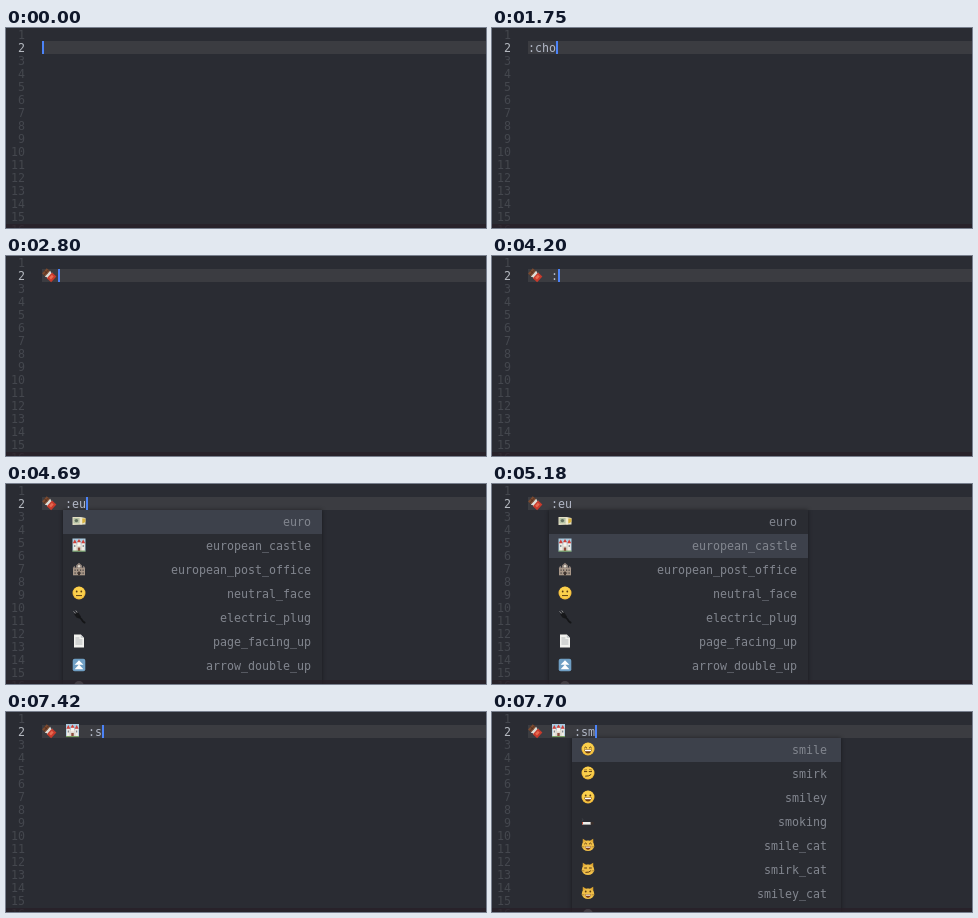
An HTML page that plays this animation: 480 px wide and 200 px high, repeating every 8 s.

```html
<!DOCTYPE html>
<html lang="en">
<head>
<meta charset="utf-8">
<title>Emoji autocomplete</title>
<style>
html, body { margin: 0; width: 100%; height: 100%; overflow: hidden; background: #2a2c33; }
svg { display: block; width: 480px; height: 200px; }
text { font: 11.63px "DejaVu Sans Mono", monospace; white-space: pre; }
.body { filter: drop-shadow(0 0 2px rgba(0, 0, 0, .45)); }
</style>
</head>
<body>
<svg id="stage" viewBox="0 0 480 200"></svg>
<script>
const LOOP = 8000, CHAR = 7, EMOJI = 16, LEFT = 36, ROW = 24;

// Small drawing helpers; every icon lives in a 14 x 14 box.
const rect = (x, y, w, h, fill, more = '') =>
  `<rect x="${x}" y="${y}" width="${w}" height="${h}" fill="${fill}" ${more}/>`;
const path = (d, fill) => `<path d="${d}" fill="${fill}"/>`;
const line = (d, color, width = 1) =>
  `<path d="${d}" fill="none" stroke="${color}" stroke-width="${width}" stroke-linecap="round"/>`;
const disc = (x, y, r, fill) => `<circle cx="${x}" cy="${y}" r="${r}" fill="${fill}"/>`;
const at = (x, y, inner) => `<g transform="translate(${x} ${y})">${inner}</g>`;
const label = (x, y, str, fill, anchor = 'start') =>
  `<text x="${x}" y="${y}" fill="${fill}" text-anchor="${anchor}">${str}</text>`;

const face = inner => disc(7, 7, 6.5, '#f3bd3c') + disc(7, 6.3, 5.6, '#fbd04c') + inner;
const eyes = disc(4.7, 5.5, .9, '#5d3b12') + disc(9.3, 5.5, .9, '#5d3b12');
const grin = path('M3.2 7.6H10.8Q10 11.6 7 11.6Q4 11.6 3.2 7.6Z', '#6e3d14') +
  rect(4, 7.8, 6, 1.4, '#fff');
const happy = line('M3.5 5.8Q4.6 4 5.7 5.8M8.3 5.8Q9.4 4 10.5 5.8', '#5d3b12');
const cat = inner => path('M1.6 7L1.8 .8L5.2 2.8H8.8L12.2 .8L12.4 7Z', '#dba431') +
  `<ellipse cx="7" cy="7.8" rx="6.2" ry="5.2" fill="#efbe48"/>` +
  line('M.4 8.6L3 8.8M13.6 8.6L11 8.8', '#8b6a2a', .6) + inner;
const catGrin = path('M4 8.6H10Q9.4 11.7 7 11.7Q4.6 11.7 4 8.6Z', '#7a3a18') +
  rect(4.6, 8.7, 4.8, 1, '#fff');
const windows = (y, fill) => [2.5, 5, 8, 10.5].map(x => rect(x, y, 1.2, 1.6, fill)).join('');

const icons = {
  chocolate_bar: `<g transform="rotate(42 7 7)">` + rect(.8, 3.5, 5, 7, '#7b4a2f') +
    line('M3.2 3.8V10.2M1 7H5.4', '#4d2a1c', .7) +
    path('M5 3L7.5 4L8.2 3V11L7 10L5 11Z', '#dcdcd6') +
    rect(7.6, 3.1, 5.8, 7.8, '#c83a2c') + rect(9, 5, 2.4, 4, '#e86a50') + '</g>',
  european_castle: rect(.5, .5, 13, 13, '#a9cbe0') +
    rect(1.3, 5, 3, 8, '#f0ece4') + rect(9.7, 5, 3, 8, '#f0ece4') +
    rect(4, 6.5, 6, 6.5, '#dfd9d0') + rect(5.5, 4, 3, 4, '#f7f3ec') +
    path('M.8 5.2L2.8 1.6L4.8 5.2ZM9.2 5.2L11.2 1.6L13.2 5.2ZM5 4.2L7 1L9 4.2Z', '#cf3f38') +
    rect(5.8, 9.5, 2.4, 3.5, '#8b4a3b') + rect(2.3, 7, 1, 2, '#66707a') +
    rect(10.7, 7, 1, 2, '#66707a') + rect(.5, 12.6, 13, 1, '#6e9a55'),
  european_post_office: rect(1, 6, 12, 7.3, '#a89788') +
    path('M4 6V3.6L7 .8L10 3.6V6ZM.6 6.2L2.3 3.8L4 6.2ZM10 6.2L11.7 3.8L13.4 6.2Z', '#8d8079') +
    disc(7, 4.2, 1.2, '#e4ddd0') + windows(7.4, '#56504d') + windows(10.3, '#56504d') +
    rect(6, 9.6, 2, 3.7, '#41352f'),
  euro: path('M.5 3H9L13.5 4V10.6L.5 11Z', '#e3dfc4') + rect(1.5, 4, 6, 5.4, '#b5c2a4') +
    disc(4.4, 6.6, 1.7, '#62705e') + rect(8.2, 4.4, 2, 6, '#f2ecd0') +
    path('M10.3 4.4H13.4V8L10.3 9.6Z', '#d9b23e'),
  neutral_face: face(eyes + line('M4.4 9.6H9.6', '#5d3b12')),
  electric_plug: line('M1.8 1.6L3.8 3.6M4 .8L5.4 2.6', '#8b8b8b') +
    path('M2.2 4.2L6 2.2L9 6.4L7 8.4L4.4 7.6Z', '#17181a') +
    line('M7.4 7.2L9.4 9.2Q10.4 11.4 12.6 12.6', '#141517', 1.8),
  page_facing_up: path('M2 .5H8.8L12 3.8V13.5H2Z', '#f1f1ee') + path('M8.8 .5V3.8H12Z', '#bfc3c6') +
    line('M3.8 4H7M3.8 6H10M3.8 8H10M3.8 10H10', '#9a9ea3', .7),
  arrow_double_up: rect(.7, .7, 12.6, 12.6, '#6f9fc4', 'rx="2"') +
    path('M7 2.2L11.4 6.8H2.6ZM7 6.6L11.4 11.2H2.6Z', '#fff'),
  smile: face(happy + grin),
  smirk: face(line('M3.4 5.6H5.8M8.2 5.6H10.6M4.6 10.2Q8.4 10.4 10 8.6', '#5d3b12') +
    line('M3.4 4L5.6 3.8M8.4 3.4L10.6 4', '#8a5a1c', .7)),
  smiley: face(eyes + grin),
  smoking: rect(1, 8, 9, 2.6, '#eeeeea') + rect(9.6, 8, 3, 2.6, '#3a2f2b') +
    rect(1, 8, 1, 2.6, '#bb4d3b') + line('M1.4 6.6Q2.4 5.6 1.6 4.8', '#4a4d53', .7),
  smile_cat: cat(happy + catGrin),
  smirk_cat: cat(line('M3.6 6H5.6M8.4 6H10.4M4.8 10.4Q8.4 10.6 9.6 9', '#5d3b12')),
  smiley_cat: cat(eyes + catGrin),
  anchor: line('M7 4V12.4M4.4 6H9.6M1.8 9Q3 12.6 7 12.6Q11 12.6 12.2 9', '#8f9aa5', 1.5) +
    `<circle cx="7" cy="2.4" r="1.5" fill="none" stroke="#8f9aa5"/>`,
  school: rect(.8, 5, 12.4, 8, '#d9c9a8') + rect(4.8, 2, 4.4, 11, '#eadfc6') +
    disc(7, 4.2, 1.2, '#fff') + windows(7, '#5b8ca8') + rect(6, 10, 2, 3, '#7b5137'),
  cherry_blossom: [0, 72, 144, 216, 288].map(a =>
    `<ellipse cx="7" cy="3.6" rx="2.7" ry="3.2" fill="#f3a9bf" transform="rotate(${a} 7 7)"/>`).join('') +
    disc(7, 7, 1.8, '#d6547c'),
  school_satchel: rect(2, 2.5, 10, 11, '#c33c32', 'rx="3"') + rect(3.4, 7.5, 7.2, 5, '#de5a46', 'rx="1"') +
    line('M5.2 2.4Q7 -.4 8.8 2.4', '#7f2822') + rect(6.2, 7, 1.6, 2, '#e6c268'),
  children_crossing: path('M7 .4L13.6 7L7 13.6L.4 7Z', '#f0bd32') +
    disc(5.4, 4.6, 1, '#222') + disc(8.8, 5.4, .9, '#222') +
    line('M5.4 6V8L4 10M5.4 8L6.4 10M8.8 6.6V8.4L8 10M8.8 8.4L10 9.8', '#222', .9),
  chart_with_downwards_trend: rect(.8, .8, 12.4, 12.4, '#edf0f2') +
    line('M1 5H13M1 9H13M5 1V13M9 1V13', '#bdc7cf', .5) +
    line('M2 3L5 5.6L7.4 4.8L12 11', '#3a72c4', 1.2)
};

const menus = {
  cho: { x: 34, w: 252, pad: 12, items: ['chocolate_bar', 'anchor', 'school', 'cherry_blossom',
    'school_satchel', 'children_crossing', 'chart_with_downwards_trend'] },
  eu: { x: 57, w: 259, pad: 11, items: ['euro', 'european_castle', 'european_post_office',
    'neutral_face', 'electric_plug', 'page_facing_up', 'arrow_double_up'] },
  sm: { x: 80, w: 269, pad: 14, items: ['smile', 'smirk', 'smiley', 'smoking',
    'smile_cat', 'smirk_cat', 'smiley_cat'] }
};

// time, line (C = chocolate, K = castle), caret shown, menu, selected row
const steps = [
  [0, '', 1], [70, '', 0], [560, '', 1], [980, '', 0],
  [1330, ':', 1], [1610, ':c', 1], [1750, ':cho', 1],
  [1890, ':cho', 1, 'cho', 0], [2310, ':cho', 0, 'cho', 0], [2730, ':cho', 1, 'cho', 0],
  [2800, 'C', 1], [3360, 'C', 0], [3500, 'C ', 1], [3990, 'C ', 0],
  [4200, 'C :', 1], [4480, 'C :e', 1],
  [4690, 'C :eu', 1, 'eu', 0], [5110, 'C :eu', 0, 'eu', 0], [5180, 'C :eu', 0, 'eu', 1],
  [5530, 'C :eu', 1, 'eu', 1], [5950, 'C :eu', 0, 'eu', 1],
  [6230, 'C K', 1], [6720, 'C K', 0], [6860, 'C K ', 1],
  [7140, 'C K :', 1], [7420, 'C K :s', 1], [7630, 'C K :sm', 1], [7700, 'C K :sm', 1, 'sm', 0]
];

const gutter = Array.from({ length: 16 }, (_, i) =>
  label(19, 13 * i + 11, i + 1, i === 1 ? '#b4b8bf' : '#44474e', 'end')).join('');

function drawMenu(name, picked) {
  const { x, w, pad, items } = menus[name];
  const rows = items.map((item, i) =>
    at(x + 9, 30 + ROW * i, icons[item]) +
    label(x + w - pad, 42 + ROW * i, item, '#82868f', 'end')).join('');
  return rect(x, 26, w, 190, '#2a2c32', 'class="body"') +
    rect(x, 26 + ROW * picked, w, ROW, '#3d414b') + rows +
    disc(x + 16, 202, 5, '#84868a');
}

function drawLine(str, caret) {
  let x = LEFT, out = '', run = '', runX = LEFT;
  for (const c of str) {
    if (c === 'C' || c === 'K') {
      out += c === 'C' ? at(x, 12, icons.chocolate_bar) : at(x + .5, 11.5, icons.european_castle);
      x += EMOJI;
      runX = x;
      run = '';
    } else {
      run += c;
      x += CHAR;
    }
  }
  if (run.trim()) out += label(runX + CHAR * run.indexOf(':'), 24, run.trim(), '#b2b8c6');
  return out + (caret ? rect(x, 13, 2, 13, '#4c83f7') : '');
}

const stage = document.getElementById('stage');
let shown = null;

function render(t) {
  const step = steps.findLast(s => s[0] <= t);
  if (step === shown) return;
  shown = step;
  const [, str, caret, menu, picked] = step;
  stage.innerHTML = rect(0, 0, 480, 200, '#2a2c33') + rect(LEFT, 13, 444, 13, '#3b3c41') +
    gutter + (menu ? drawMenu(menu, picked) : '') + drawLine(str, caret) +
    rect(0, 196, 480, 4, '#281f27', 'opacity=".7"');
}

const start = performance.now();
function tick() {
  render((performance.now() - start) % LOOP);
  requestAnimationFrame(tick);
}
render(0);
requestAnimationFrame(tick);
</script>
</body>
</html>
```
